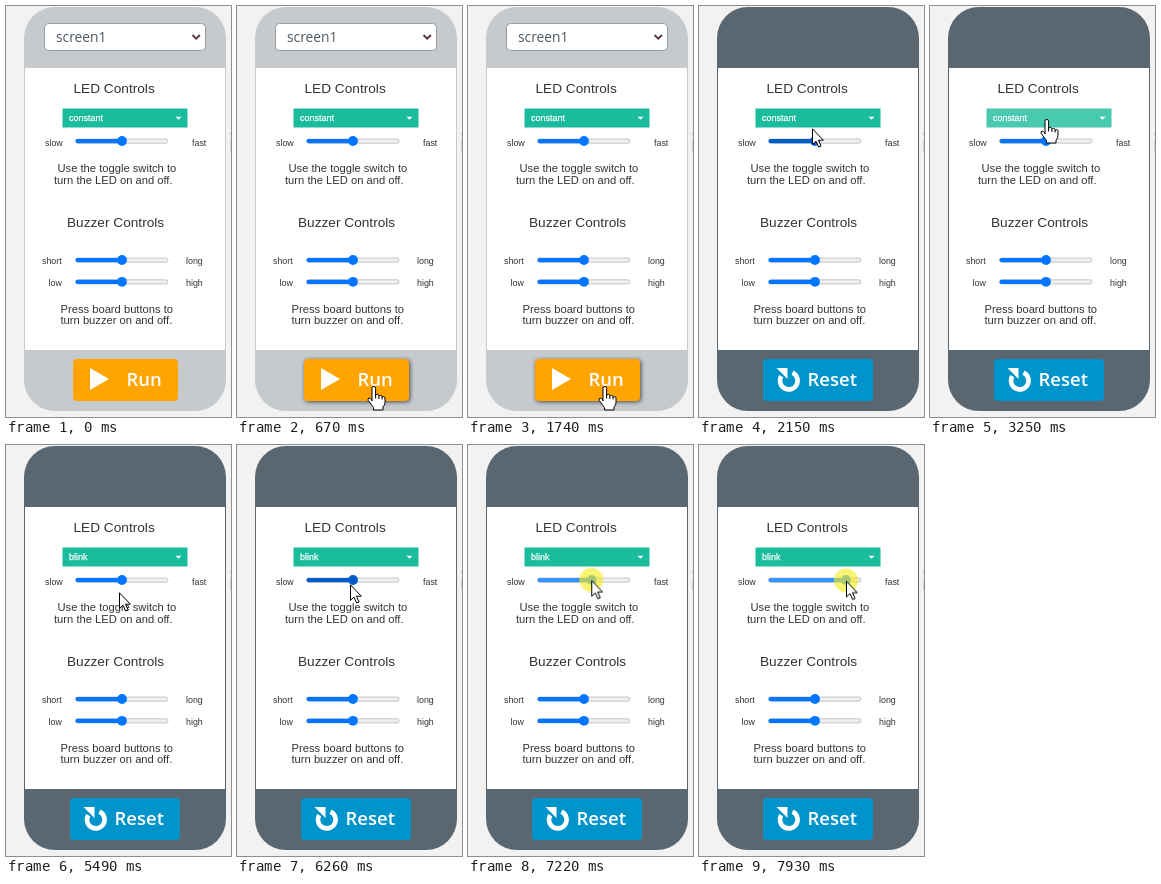
An HTML page for the animation above (8 s loop, 225 px wide and 411 px high).

```html
<!DOCTYPE html>
<html lang="en">
<head>
<meta charset="utf-8">
<title>Phone controls</title>
<style>
html, body { margin: 0; width: 100%; height: 100%; overflow: hidden; background: #f2f2f2; }
svg { display: block; width: 100vw; height: 100vh; }
text { font-family: "Liberation Sans", Arial, sans-serif; fill: #333; }
.title { font-size: 13.67px; }
.note { font-size: 11.2px; }
.tag { font-size: 8.9px; }
.pick { font-size: 9px; fill: #fff; stroke: #fff; stroke-width: .25px; }
.item { font-size: 14px; fill: #fff; }
.btn { font: 600 18.5px "Open Sans", "Noto Sans", sans-serif; fill: #fff; }
.name { font: 13.8px "Open Sans", "Noto Sans", sans-serif; fill: #4d575f; }

/* hard state changes */
.step { animation: 8s step-end infinite; }
.phone { animation-name: phone; }
.idle { animation-name: idle; }
.running { animation-name: running; }
.lift { animation-name: lift; }
.run { fill: #ffa400; animation-name: press; }
.pickbox { fill: #1abc9c; animation-name: pickbox; }
.before { animation-name: before; }
.after { animation-name: after; }
.menu { animation-name: menu; filter: drop-shadow(0 2px 3px rgba(0, 0, 0, .4)); }
.mark { animation-name: mark; }
.speed { color: #0075ff; animation-name: speed; }
.halo { animation-name: halo; }
.hand { animation-name: hand; }
.arrow { animation-name: arrow; }

/* continuous motion */
.cursor { animation: path 8s linear infinite; }
.thumb { animation: drag 8s linear infinite; }

@keyframes phone { 0% { fill: #c6cacd } 23.375%, 100% { fill: #5b6770 } }
@keyframes idle { 0% { opacity: 1 } 23.375%, 100% { opacity: 0 } }
@keyframes running { 0% { opacity: 0 } 23.375%, 100% { opacity: 1 } }
@keyframes lift {
  0% { filter: none }
  4.8% { filter: drop-shadow(1px 1px 2px rgba(0, 0, 0, .65)) }
  24.2%, 100% { filter: none }
}
@keyframes press { 0% { fill: #ffa400 } 13.5% { fill: #f79d00 } 21.75%, 100% { fill: #ffa400 } }
@keyframes pickbox { 0% { fill: #1abc9c } 38.5% { fill: #48c9b0 } 68.625%, 100% { fill: #1abc9c } }
@keyframes before { 0% { opacity: 1 } 68.625%, 100% { opacity: 0 } }
@keyframes after { 0% { opacity: 0 } 68.625%, 100% { opacity: 1 } }
@keyframes menu { 0% { opacity: 0 } 44.875% { opacity: 1 } 68.625%, 100% { opacity: 0 } }
@keyframes mark { 0% { transform: none } 52.35%, 100% { transform: translateY(18px) } }
@keyframes speed {
  0% { color: #0075ff }
  26.4% { color: #005cc8 }
  38.5% { color: #0075ff }
  73.3% { color: #005cc8 }
  84.125%, 100% { color: #3793ff }
}
@keyframes halo {
  0% { opacity: 0 }
  13.5% { opacity: 1 }
  21.75% { opacity: 0 }
  44% { opacity: 1 }
  46.5% { opacity: 0 }
  64.5% { opacity: 1 }
  68.625% { opacity: 0 }
  84.125%, 100% { opacity: 1 }
}
@keyframes hand {
  0% { opacity: 0 }
  4.8% { opacity: 1 }
  24.2% { opacity: 0 }
  38.5% { opacity: 1 }
  47.5%, 100% { opacity: 0 }
}
@keyframes arrow {
  0% { opacity: 0 }
  2.25% { opacity: 1 }
  4.8% { opacity: 0 }
  24.2% { opacity: 1 }
  38.5% { opacity: 0 }
  47.5%, 100% { opacity: 1 }
}
@keyframes path {
  0%, 2.25% { transform: translate(187px, 405px) }
  8.375%, 23.375% { transform: translate(137px, 381px) }
  24.25% { transform: translate(134px, 352px) }
  25.125% { transform: translate(124px, 250px) }
  26% { transform: translate(116px, 160px) }
  26.875% { transform: translate(113px, 122px) }
  31.125% { transform: translate(113px, 132px) }
  32%, 35.25% { transform: translate(113px, 133px) }
  40.625%, 45.625% { transform: translate(117px, 114px) }
  52% { transform: translate(115px, 139px) }
  53.75% { transform: translate(113px, 144px) }
  56.25%, 68.625% { transform: translate(113px, 147px) }
  71.25%, 73.125% { transform: translate(113px, 144px) }
  78.25%, 80.75% { transform: translate(113px, 139px) }
  81.625%, 84.125% { transform: translate(113px, 136px) }
  93.75% { transform: translate(129px, 134px) }
  99.125%, 100% { transform: translate(147px, 135.5px) }
}
@keyframes drag {
  0%, 84.12% { transform: none }
  84.125% { transform: translateX(-2.5px) }
  93.75% { transform: translateX(13.5px) }
  99.125%, 100% { transform: translateX(31px) }
}
</style>
</head>
<body>
<svg viewBox="0 0 225 411">
  <defs>
    <rect id="rail" x="69.5" y="-2" width="92.5" height="4.2" rx="2.1"/>
    <clipPath id="inrail"><use href="#rail"/></clipPath>
    <g id="track"><use href="#rail" fill="#efefef" stroke="#b2b2b2" stroke-width=".7"/></g>
  </defs>

  <path d="M224.5 126v3M224.5 134v11" stroke="#d0d0d0"/>
  <rect class="step phone" x="18" y="1" width="202" height="404" rx="31"/>
  <rect x="19" y="62" width="200" height="282" fill="#fff"/>

  <g class="step idle">
    <rect x="38.5" y="17.5" width="161" height="27" rx="4" fill="#fff" stroke="#949ca2"/>
    <text class="name" x="50" y="36">screen1</text>
    <path d="M186.5 29l3.7 3.7 3.7-3.7" fill="none" stroke="#5a3a4a" stroke-width="2"/>
    <g class="step lift">
      <rect class="step run" x="67" y="353" width="105" height="42" rx="4"/>
      <path d="M84 362v22l19-11z" fill="#fff"/>
      <text class="btn" x="120.5" y="380">Run</text>
    </g>
  </g>

  <g class="step running">
    <g class="step lift">
      <rect x="64" y="353" width="110" height="42" rx="4" fill="#0094ca"/>
      <path d="M93.5 366.6A8.8 8.8 0 1 1 82.2 370.2" fill="none" stroke="#fff" stroke-width="4.6"/>
      <path d="M77.5 362h11v11z" fill="#fff"/>
      <text class="btn" x="108.5" y="380">Reset</text>
    </g>
  </g>

  <text class="title" x="67.5" y="87">LED Controls</text>
  <text class="title" x="61" y="221">Buzzer Controls</text>
  <text class="note" x="51.5" y="166">Use the toggle switch to</text>
  <text class="note" x="48" y="178">turn the LED on and off.</text>
  <text class="note" x="54.5" y="307">Press board buttons to</text>
  <text class="note" x="54.5" y="318">turn buzzer on and off.</text>
  <text class="tag" x="39" y="140">slow</text>
  <text class="tag" x="186" y="140">fast</text>
  <text class="tag" x="36" y="258">short</text>
  <text class="tag" x="180" y="258">long</text>
  <text class="tag" x="42.5" y="279.5">low</text>
  <text class="tag" x="180" y="279.5">high</text>

  <g class="step speed" fill="currentColor">
    <g transform="translate(0 135)">
      <use href="#track"/>
      <g clip-path="url(#inrail)"><rect class="thumb" x="20" y="-3" width="96" height="6"/></g>
      <circle class="thumb" cx="116" r="4.9"/>
    </g>
  </g>
  <g fill="#0075ff">
    <g id="still" transform="translate(0 254)">
      <use href="#track"/>
      <rect x="69.5" y="-2" width="46" height="4.2" rx="2.1"/>
      <circle cx="116" r="4.9"/>
    </g>
    <use href="#still" y="21.8"/>
  </g>

  <rect class="step pickbox" x="56.5" y="102.5" width="125" height="19"/>
  <text class="pick step before" x="63" y="115">constant</text>
  <text class="pick step after" x="63" y="115">blink</text>
  <path d="M169.5 110.8h6l-3 3z" fill="#fff"/>

  <g class="step menu">
    <rect x="57" y="122" width="125" height="56" fill="#1abc9c"/>
    <rect class="step mark" x="57" y="122" width="125" height="18.5" fill="#1e90ff"/>
    <text class="item" x="68" y="136">constant</text>
    <text class="item" x="68" y="154">blink</text>
    <text class="item" x="68" y="172">pulse</text>
  </g>

  <g class="cursor">
    <circle class="step halo" r="12" fill="#f5eb14" fill-opacity=".6"/>
    <g class="step hand" stroke="#000" stroke-linejoin="round">
      <path fill="#fff" d="M-2 14V1.2a1.8 1.8 0 0 1 3.6 0V8.5a1.7 1.7 0 0 1 3.3.2v.6a1.7 1.7 0 0 1 3.2.4v.8a1.5 1.5 0 0 1 2.9.5v4.5Q11 18 9 20v3H-.5V20.5L-5.8 13.5Q-6.6 11.5-5 11Q-3.6 10.9-2 13.2Z"/>
      <path fill="none" d="M1.6 8v3.5M4.9 9v3M8.1 10v2.5"/>
    </g>
    <path class="step arrow" fill="#fff" stroke="#000" d="M.5 .8V16.5L4 13.1 6.7 19 9.1 18 6.5 12.2H11.3Z"/>
  </g>
</svg>
</body>
</html>
```
